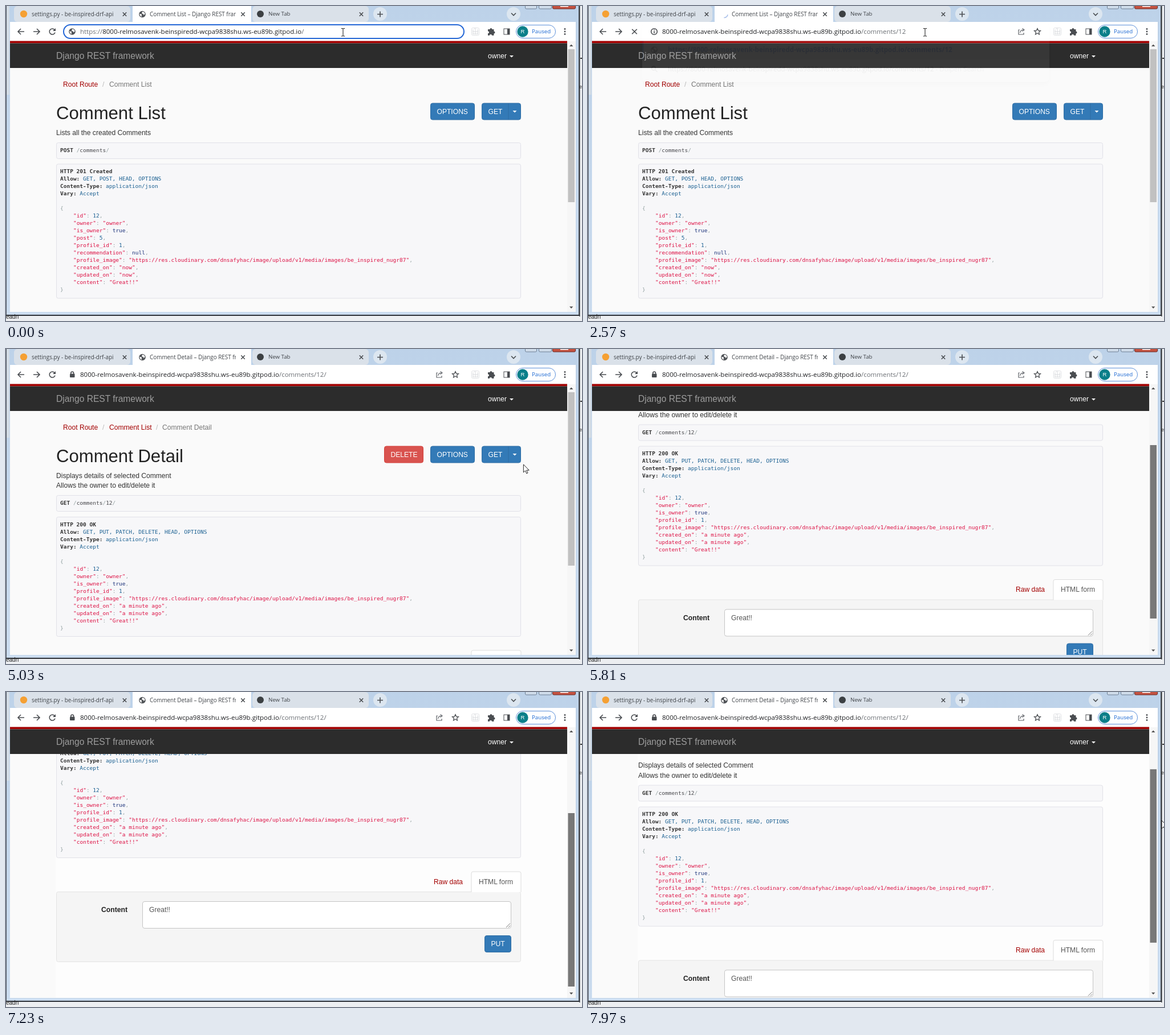
An HTML page for the animation above (8000 ms loop, 1010 px wide and 554 px high).

```html
<!DOCTYPE html>
<html lang="en">
<head>
<meta charset="utf-8">
<title>REST browser session</title>
<style>
html, body { margin: 0; width: 100%; height: 100%; overflow: hidden; }
svg { display: block; }
text { font-family: 'Liberation Sans', Arial, sans-serif; }
.ui { font-family: 'Open Sans', 'Noto Sans', sans-serif; }
.mono { font-family: 'DejaVu Sans Mono', monospace; }
.b { font-weight: 700; }
.line { fill: none; stroke: #4a4d51; stroke-width: 1.6; }
.drop { filter: drop-shadow(0 5px 4px #0004); }
</style>
</head>
<body>
<svg id="stage" width="1010" height="554" viewBox="0 0 1010 554"></svg>
<script>
const stage = document.getElementById('stage');
const LOOP = 8000;
const HOST = '8000-relmosavenk-beinspiredd-wcpa9838shu.ws-eu89b.gitpod.io';
const USER = 'owner';
const IMAGE = 'https://res.cloudinary.com/dnsafyhac/image/upload/v1/media/images/be_inspired_nugr87';
const RED = '#a30000', STR = '#dd1144', LIT = '#195f91', PUN = '#93a1a1', KWD = '#1e347b';
const DARK = '#202124', GREY = '#6b6f74';

// [time, content offset, thumb top if it runs ahead of the content]
const SCROLL = [[0, 0], [5630, 16], [5690, 55], [5750, 92], [5810, 124.5, 169], [5910, 165], [5970, 190],
  [6620, 198], [6700, 207], [6780, 214], [7290, 200], [7360, 182], [7430, 165],
  [7720, 150], [7780, 135], [7840, 120], [7910, 106], [7970, 93.5]];
const FADE = [[0, 0], [190, 1], [2390, .5], [2450, .25], [2510, .12], [2570, .06], [2630, .03], [2700, 0]];
const PATHS = [[0, '/'], [190, '/comments/'], [1760, '/comments/1'], [1890, '/comments/12'], [3270, '/comments/12/']];
const POINTER = [[0, 591, 46], [4330, 591, 46], [4540, 850, 228], [4740, 850, 228], [5450, 990, 167],
  [5580, 990, 167], [5750, 1012, 230], [7230, 1012, 304], [7430, 1007, 273], [7680, 1007, 273], [7970, 1006, 226]];

const stepAt = (keys, t) => keys.filter(k => k[0] <= t).pop();
function glide(keys, t) {
  const i = keys.findIndex(k => k[0] > t);
  if (i < 0) return keys[keys.length - 1].slice(1);
  const a = keys[i - 1], b = keys[i], u = (t - a[0]) / (b[0] - a[0]);
  return [1, 2].map(n => a[n] + (b[n] - a[n]) * u);
}

// y is the middle of the capitals
const text = (x, y, s, fill = '#333', size = 12.1, cls = '') =>
  `<text x="${x}" y="${y + size * .36}" fill="${fill}" font-size="${size}" class="${cls}">${s}</text>`;
const ui = (x, y, s, fill = DARK, size = 11.5, cls = '') => text(x, y, s, fill, size, 'ui ' + cls);
const mono = (x, y, s, fill = '#48484c') => text(x, y, s, fill, 9.5, 'mono');
const tok = (s, fill) => `<tspan fill="${fill}">${s}</tspan>`;
const bold = s => `<tspan class="b" fill="#333">${s}</tspan>`;
const rect = (x, y, w, h, fill, stroke = 'none', r = 0) =>
  `<rect x="${x}" y="${y}" width="${w}" height="${h}" rx="${r}" fill="${fill}" stroke="${stroke}"/>`;
const disc = (x, y, r, fill, stroke = 'none') =>
  `<circle cx="${x}" cy="${y}" r="${r}" fill="${fill}" stroke="${stroke}"/>`;
const path = (d, attrs = 'class="line"') => `<path d="${d}" ${attrs}/>`;
const fillPath = (d, fill) => path(d, `fill="${fill}"`);
const clip = (x, y, w, h, body) =>
  `<svg x="${x}" y="${y}" width="${w}" height="${h}" viewBox="${x} ${y} ${w} ${h}">${body}</svg>`;
const cross = (x, y, r) => path(`M${x - r} ${y - r}l${2 * r} ${2 * r}m0 ${-2 * r}l${-2 * r} ${2 * r}`);

const globe = (x, y) => disc(x, y, 5.8, '#505357') +
  fillPath(`M${x - 4.6} ${y - 1}l4 1.6-1 1.6 1 2.4q-4-1-4-5.6zM${x} ${y - 4.6}q4 0 4.6 4l-2 2-1-2-2.6-.6z`, '#fff');
const lens = (x, y) => `<circle cx="${x - 1}" cy="${y - 1}" r="3.4" class="line"/>` + path(`M${x + 1.5} ${y + 1.5}l4 4`);
const button = (x, y, w, label, fill = '#337ab7', edge = '#2e6da4') =>
  rect(x + .5, y + .5, w - 1, 29, fill, edge, 3.5) + text(x + 11.5, y + 15, label, '#fff');
const caret = (x, y, fill) => fillPath(`M${x - 3.5} ${y - 1.5}h7l-3.5 3.6z`, fill);

function windowFrame() {
  const icon = `M821 40h3M818 45h10M818 49h10M819 41v9M823 41v9M827 41v9`;
  return `<defs><linearGradient id="glass" x2="0" y2="1"><stop stop-color="#bdd2e9"/>
    <stop offset="1" stop-color="#cbdcef"/></linearGradient></defs>` +
    rect(0, 0, 1010, 554, '#eceef1') +
    rect(0, 0, 1005, 545, '#4a4f57') + rect(1, 0, 1003, 543, 'url(#glass)') +
    rect(1, 0, 5, 156, '#d3dce6') + rect(1005, 0, 1.5, 546, '#33373d') + rect(0, 543, 1006, 1.8, '#2b2f35') +
    rect(1007, 91, 3, 2, '#333') + text(1005, 142, 'e', '#333', 9) + text(0, 546, 'eadn', '#222', 10) +
    rect(910.5, -5, 20, 10, '#cfdcea', '#6d7f94', 2) + rect(934.5, -5, 22, 10, '#cfdcea', '#6d7f94', 2) +
    rect(958.5, -5, 40, 10, '#c4513f', '#6b2a26', 2) + rect(972, 0, 14, 1.5, '#fff') +
    rect(14, 0, 204, 28, '#dae1e9', 'none', 6) + rect(432, 0, 204, 28, '#dae1e9', 'none', 6) +
    rect(222, -6, 208, 40, '#fff', 'none', 7) + rect(7, 28, 992, 34, '#fff') +
    disc(31, 14, 6.2, '#f5a033') + clip(45, 2, 147, 24, ui(45, 14, 'settings.py - be-inspired-drf-api', '#3f4348', 9.9)) +
    disc(446, 14, 6, '#3c4043') + ui(460, 14, 'New Tab', '#3f4348', 9.7) +
    cross(208, 14.5, 3.2) + cross(415.5, 14.5, 3.2) + cross(623, 14.5, 3.2) +
    disc(656, 14, 12, '#dce6f0') + path('M651 14.5h10m-5-5v10') +
    disc(890, 14, 12, '#dce6f0') + path('M886 12.5l4 4 4-4') +
    path('M32 45H21m5-5l-5 5 5 5') + path('M48 45h11m-5-5l5 5-5 5') +
    path(icon, 'stroke="#d9dbde" fill="none"') + rect(816.5, 38.5, 13, 13, 'none', '#dfe1e4', 2) +
    fillPath('M845 41h3.4a2 2 0 0 1 4 0h3.1v3.5a2 2 0 0 1 0 4v3.3h-3.6a2 2 0 0 0-4 0H845v-3.6a2 2 0 0 0 0-4z', '#4a4d51') +
    rect(873, 40, 10, 10, 'none', '#4a4d51') + rect(879, 40, 4, 10, '#4a4d51') +
    rect(894.5, 33.5, 69, 23, '#fff', '#5b8fd9', 11.5) + disc(906, 45, 9.7, '#0b7f8a') +
    text(902.6, 45, 'R', '#fff', 9.5) + ui(922, 45, 'Paused', '#1967d2', 9.7) +
    [40.5, 45, 49.5].map(y => disc(980, y, 1.4, '#4a4d51')).join('');
}

function request(y, verb, url) {
  return rect(88.5, y + .5, 814, 28, '#f7f7f9', '#e1e1e8', 3) +
    mono(95, y + 14, bold(verb) + ' ' + url.replace(/\//g, tok('/', PUN)));
}

function response(y, h, status, allow, fields) {
  const head = [bold(status)].concat([['Allow', allow], ['Content-Type', 'application/json'], ['Vary', 'Accept']]
    .map(([k, v]) => bold(k + ':') + ' ' + tok(v, LIT)));
  const color = v => v[0] === '"' ? STR : /\d/.test(v) ? LIT : KWD;
  const rows = fields.map(([k, v], i) => tok(`"${k}"`, STR) + tok(':', PUN) + ' ' + tok(v, color(v)) +
    (i < fields.length - 1 ? tok(',', PUN) : ''));
  const lineY = i => y + 13.5 + 13 * i;
  return rect(88.5, y + .5, 814, h, '#f7f7f9', '#e1e1e8', 3) +
    head.map((s, i) => mono(95, lineY(i), s)).join('') + mono(95, lineY(5), '{', PUN) +
    rows.map((s, i) => mono(118, lineY(6 + i), s)).join('') + mono(95, lineY(6 + rows.length), '}', PUN);
}

function heading(title) {
  return text(88, 188, title, '#222', 31.1) + button(744, 170.5, 78, 'OPTIONS') + button(834, 170.5, 69, 'GET') +
    rect(880.5, 171, 1, 29, '#2e6da4') + caret(892, 185.5, '#fff') +
    text(100, 138, 'Root Route', RED) + text(169, 138, '/', '#bbb');
}

const listPage = heading('Comment List') + text(181, 138, 'Comment List', '#777') +
  text(88, 223, 'Lists all the created Comments') + request(240, 'POST', '/comments/') +
  response(277.5, 236, 'HTTP 201 Created', 'GET, POST, HEAD, OPTIONS', [
    ['id', '12'], ['owner', `"${USER}"`], ['is_owner', 'true'], ['post', '5'], ['profile_id', '1'],
    ['recommendation', 'null'], ['profile_image', `"${IMAGE}"`], ['created_on', '"now"'],
    ['updated_on', '"now"'], ['content', '"Great!!"']]);

const detailPage = heading('Comment Detail') + text(181, 138, 'Comment List', RED) + text(263, 138, '/', '#bbb') +
  text(274, 138, 'Comment Detail', '#777') + button(663, 170.5, 69, 'DELETE', '#d9534f', '#d43f3a') +
  text(88, 222.5, 'Displays details of selected Comment') + text(88, 240, 'Allows the owner to edit/delete it') +
  request(257, 'GET', '/comments/12/') +
  response(295, 210, 'HTTP 200 OK', 'GET, PUT, PATCH, DELETE, HEAD, OPTIONS', [
    ['id', '12'], ['owner', `"${USER}"`], ['is_owner', 'true'], ['profile_id', '1'],
    ['profile_image', `"${IMAGE}"`], ['created_on', '"a minute ago"'],
    ['updated_on', '"a minute ago"'], ['content', '"Great!!"']]) +
  rect(88.5, 565.5, 814, 123, '#f5f5f5', '#e3e3e3', 3) +
  path('M816 566v-33q0-3 3-3h81q3 0 3 3v33', 'fill="#fff" stroke="#ddd"') +
  text(750, 547.5, 'Raw data', RED) + text(829, 547.5, 'HTML form', '#555') +
  text(167, 597, 'Content', '#222', 12.2, 'b') + rect(239.5, 582.5, 646, 47, '#fff', '#c4c4c4', 3.5) +
  text(251, 597, 'Great!!', '#555') + path('M877 628l7-7m-3 7l3-3', 'stroke="#777" fill="none"') +
  button(839, 642, 47, 'PUT');

const navbar = rect(7, 61.5, 977, 4, RED) + rect(7, 65.5, 977, 43.5, '#2c2c2c') +
  text(88, 87.5, 'Django REST framework', '#9d9d9d', 15.57) + text(845, 88, USER, '#fff') + caret(886.5, 88.5, '#fff');

function scrollbar(top, height, fill) {
  return rect(984, 62, 15, 476, '#f6f6f6') + rect(985.5, top, 11.5, height, fill) +
    fillPath('M988 71h6.4l-3.2-3.6z', '#505050') + fillPath('M988 528.5h6.4l-3.2 3.6z', '#505050');
}

const address = (x, scheme, rest) => ui(x, 45, tok(scheme, GREY) + HOST + tok(rest, GREY));

function suggestions(t, rest) {
  const full = 'https://' + HOST + rest, typed = rest !== '/comments/';
  const top = typed
    ? ui(140, 77, full, '#2259c6', 11.6, 'b')
    : ui(139.5, 77, 'Comment List – Django REST framework') + ui(359, 77, '-', GREY) +
      ui(368, 77, `https://${HOST.slice(0, -5)}...`, '#2259c6', 11.6, 'b') + cross(791, 77, 3.8);
  return `<g opacity="${stepAt(FADE, t)[1]}">` + `<g class="drop">${rect(95, 30, 714, 103.5, '#fff', 'none', 8)}</g>` +
    rect(95, 61, 714, 33, '#e1e1e2') + rect(95, 61, 2.5, 33, '#2a6fdb') + globe(116, 77) + top +
    lens(116, 110.5) + ui(140, 110.5, `${full} ${tok('- Dolpen Search', GREY)}`) + '</g>';
}

function omnibox(t, rest) {
  if (t < 190) return rect(101, 33, 702, 24, '#fff', '#2467d6', 12).replace('/>', ' stroke-width="2"/>') +
    globe(116, 45) + address(130, 'https://', rest);
  if (t < 2390) {
    const blinkOn = t < 720 || t >= 1260, caretX = 594 + 6.5 * (rest.length - 10);
    return globe(116, 45) + address(140, 'https://', rest) + (blinkOn ? rect(caretX, 35, 1, 17, '#222') : '');
  }
  const mark = t < 3270
    ? '<circle cx="116" cy="45" r="5.3" class="line" stroke-width="1.2"/>' + rect(115.3, 44, 1.5, 4, '#4a4d51') + rect(115.3, 41.5, 1.5, 1.5, '#4a4d51')
    : rect(112, 43.5, 8.5, 6.5, '#4a4d51', 'none', 1) + path('M113.8 44v-1.6a2.4 2.4 0 0 1 4.8 0V44');
  return mark + address(130, '', rest) +
    path('M757 42h-2v8h9v-3M757.5 47q1-5 6-5m-2-2.6l3.5 2.6-3.5 2.6', 'fill="none" stroke="#5f6368" stroke-width="1.2"') +
    path('M788 39.5l1.6 3.6 3.9.4-2.9 2.6.8 3.9-3.4-2-3.4 2 .8-3.9-2.9-2.6 3.9-.4z', 'fill="none" stroke="#4a4d51" stroke-width="1.3"');
}

function tabTitle(t, loading) {
  const title = t < 3270 ? 'Comment List – Django REST framework'
    : t < 3930 ? 'https://' + HOST : 'Comment Detail – Django REST framework';
  const turn = Math.floor((t - 2390) / 60) * 32;
  const mark = !loading ? globe(239, 14.5)
    : path('M239 8.5a6 6 0 0 1 6 6', `fill="none" stroke="#a9c0ea" stroke-width="1.6" transform="rotate(${turn} 239 14.5)"`);
  return mark + clip(252, 2, 151, 24, ui(252, 14, title, '#3f4348', 9.9));
}

function cursor(t) {
  const [x, y] = glide(POINTER, t);
  if (y < 60) return path(`M${x - 3} ${y - 6.5}h2.3l.7.7.7-.7h2.3M${x} ${y - 6}v12.5M${x - 3} ${y + 7}h2.3l.7-.7.7.7h2.3`, 'fill="none" stroke="#111"');
  return path(`M${x} ${y}v14l3.2-3 2.2 5 2.2-1-2.2-4.8h4.4z`, 'fill="#fff" stroke="#111" stroke-width=".9"');
}

const frame = windowFrame();

function draw(t) {
  const detail = t >= 3930, loading = t >= 2390 && !detail;
  const rest = stepAt(PATHS, t)[1];
  const [, offset, ahead] = stepAt(SCROLL, t);
  const thumb = ahead || 76 + offset * 137 / 214;
  const thumbFill = t < 5330 ? '#c1c1c1' : t < 5450 ? '#a8a8a8' : '#787878';
  const open = t >= 190 && t < 2700;
  const reload = path('M85.6 42.6a5 5 0 1 0 .4 3.8') + fillPath('M87 39v5h-5z', '#4a4d51');
  return frame + rect(7, 62, 977, 476, '#fafafa') + (t >= 6620 ? rect(87, 109, 897, 429, '#fdfdfd') : '') +
    clip(7, 109, 977, 429, `<g transform="translate(0 ${-offset})">${detail ? detailPage : listPage}</g>`) +
    navbar + scrollbar(thumb, detail ? 305 : 269, thumbFill) + tabTitle(t, loading) +
    (loading ? cross(81.5, 45, 4.3) : reload) + (open ? suggestions(t, rest) : '') + omnibox(t, rest) + cursor(t);
}

let shown = '';
function tick() {
  const next = draw(performance.now() % LOOP);
  if (next !== shown) stage.innerHTML = shown = next;
  requestAnimationFrame(tick);
}
tick();
</script>
</body>
</html>
```
